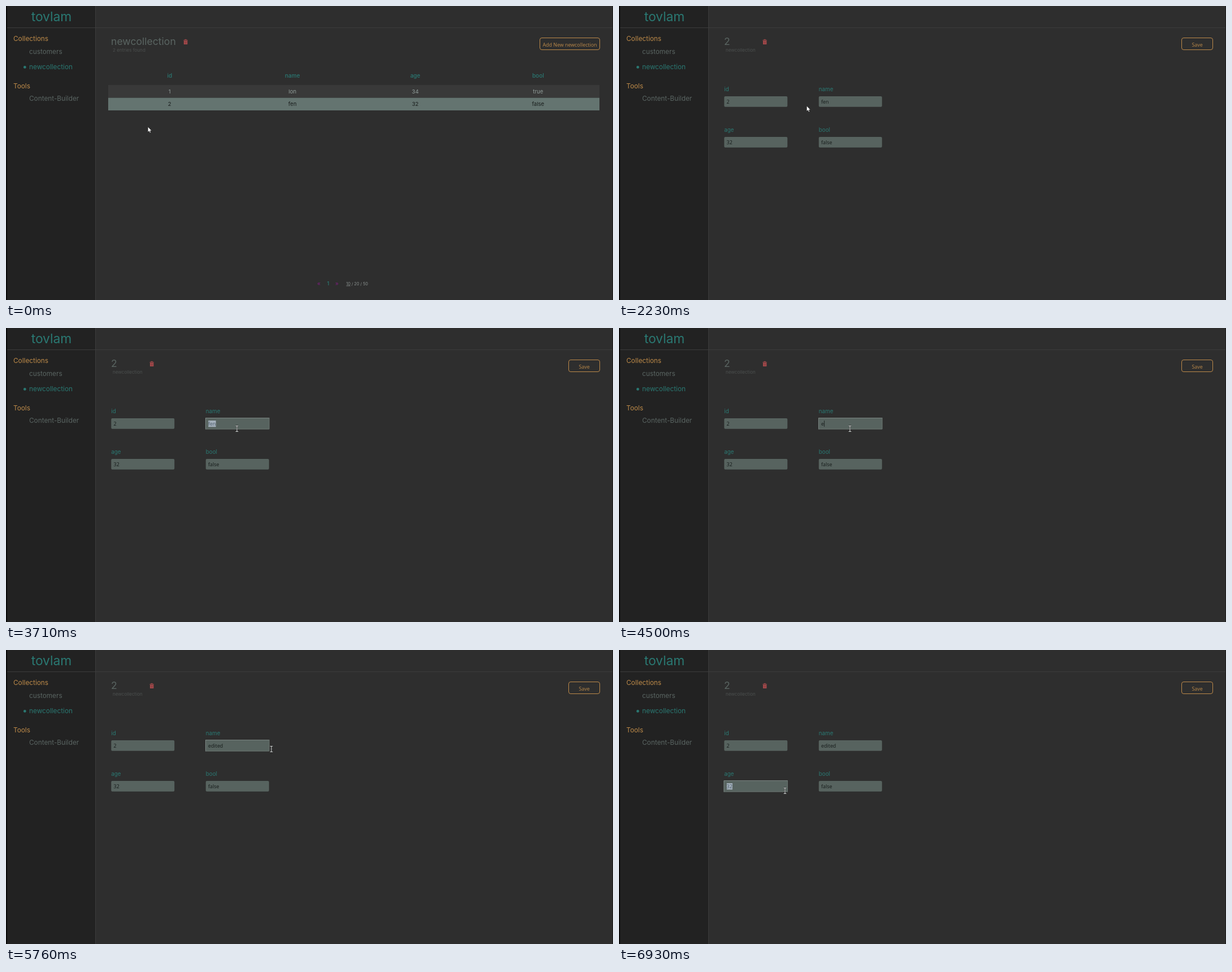
An HTML page that plays this animation: 1075 by 521 pixels, repeating every 8000 ms.

```html
<!DOCTYPE html>
<html lang="en">
<head>
<meta charset="utf-8">
<title>Collection editor</title>
<style>
  html, body { margin: 0; width: 100%; height: 100%; overflow: hidden; background: #2e2e2e; }
  svg { display: block; width: 100vw; height: 100vh; }
  text { font-family: Inter, "Open Sans", sans-serif; white-space: pre; }
  .ui { font-family: "Open Sans", "Noto Sans", sans-serif; font-size: 8.9px; }
  .mid { text-anchor: middle; }
  .teal { fill: #2a7872; }
  .gold { fill: #bd8a49; }
  .grey { fill: #5a6562; }
  .dim { fill: #4b4f4e; }
  .nav { font-size: 11.8px; }
  .title { font-size: 17.6px; }
  .sub { font-size: 8.1px; }
  .head { font-size: 10px; font-weight: 500; }
  .cell { font-size: 9.6px; }
  .label { font-size: 9.8px; }
  .btn { fill: none; stroke: #bd8a49; }
</style>
</head>
<body>
<svg viewBox="0 0 1075 521" preserveAspectRatio="none">
  <defs>
    <g id="trash">
      <path d="M2.3 1.4V.4H5.3V1.4M0 1.9H7.6" fill="none" stroke="#a94a4c"/>
      <path d="M.6 2.7H7V9H.6Z" fill="#a94a4c"/>
      <path d="M2.5 4V8M3.8 4V8M5.1 4V8" stroke="#6d3839" stroke-width=".5"/>
    </g>
  </defs>

  <rect width="1075" height="521" fill="#2e2e2e"/>
  <rect width="158" height="521" fill="#222"/>
  <rect width="2" height="521" fill="#090909"/>
  <rect x="1074" width="1" height="521" fill="#1b1b1b"/>
  <path d="M2 38.5H1074M158.5 0V521" stroke="#3c3c3c"/>

  <text class="teal mid" x="80.5" y="27" font-size="22.8">tovlam</text>
  <g class="nav">
    <text class="gold" x="13" y="62.3">Collections</text>
    <text class="grey" x="41" y="84.5">customers</text>
    <text class="teal" x="41" y="112.3">newcollection</text>
    <text class="gold" x="13" y="146.2">Tools</text>
    <text class="grey" x="41" y="168.2">Content-Builder</text>
  </g>
  <circle class="teal" cx="33.3" cy="108.4" r="2.4"/>

  <g id="list">
    <text class="title grey" x="186" y="69">newcollection</text>
    <text class="sub dim" x="189" y="81">2 entries found</text>
    <use href="#trash" x="314.3" y="59"/>
    <rect class="btn" x="945.5" y="56.5" width="106" height="21" rx="3.5"/>
    <text class="ui gold mid" x="998.5" y="71.5">Add New newcollection</text>
    <rect x="181" y="140" width="870" height="22.5" fill="#393939"/>
    <rect x="181" y="162.7" width="870" height="22.3" fill="#647470"/>
    <g id="cells"></g>
    <g class="mid" font-size="9.5">
      <text x="554" y="494.8" fill="#6d216d" font-weight="600">«</text>
      <text class="teal" x="570.5" y="495" font-weight="500">1</text>
      <text x="586" y="494.8" fill="#6d216d" font-weight="600">»</text>
    </g>
    <text x="602.5" y="494.6" font-size="7.2" fill="#8d9492"><tspan text-decoration="underline">10</tspan> / 20 / 50</text>
  </g>

  <g id="form">
    <text class="title grey" x="186" y="69" font-size="18">2</text>
    <text class="sub dim" x="189" y="81">newcollection</text>
    <use href="#trash" x="254.4" y="59"/>
    <rect class="btn" x="996.5" y="56.5" width="55" height="21" rx="3.5"/>
    <text class="ui gold mid" x="1024" y="71.5">Save</text>
    <g id="fields"></g>
  </g>

  <g id="pointer" stroke-linejoin="round">
    <path id="arrow" d="M0 0V9.6L2.2 7.6 3.6 10.7 5.2 10 3.8 7H6.7Z" fill="#fff" stroke="#111" stroke-width=".5"/>
    <g id="hand">
      <path d="M-.9 .8Q0-.6.9 .8V4.2Q1.7 3.5 2.4 4.4 3.2 3.8 3.8 4.8 5 4.4 5.2 5.8V8Q5 9.6 4.1 10.5V12H-.8V10.8Q-2 9.2-3.4 7.2-3.8 5.8-2.4 6L-.9 7.3Z" fill="#fff" stroke="#111" stroke-width=".6"/>
      <path d="M.9 4.3V6.4M2.4 4.6V6.5M3.8 5V6.6" stroke="#333" stroke-width=".4"/>
    </g>
    <g id="beam" fill="none">
      <path d="M-2.4-5H2.4M0-5V5M-2.4 5H2.4" stroke="#1c1c1c" stroke-width="2"/>
      <path d="M-2.4-5H2.4M0-5V5M-2.4 5H2.4" stroke="#d4d8d7" stroke-width="1.1"/>
    </g>
  </g>
</svg>
<script>
const LOOP = 8000;
const OPEN_AT = 2230;
const $ = id => document.getElementById(id);

function add(parent, tag, attrs, text = '') {
  const el = document.createElementNS('http://www.w3.org/2000/svg', tag);
  for (const key in attrs) el.setAttribute(key, attrs[key]);
  el.textContent = text;
  return parent.appendChild(el);
}
const show = (el, on) => { el.style.display = on ? '' : 'none'; };

// Table
const rows = [
  ['id', 'name', 'age', 'bool'],
  ['1', 'lon', '34', 'true'],
  ['2', 'fen', '32', 'false']
];
const rowStyle = [
  { y: 127.2, class: 'head teal mid' },
  { y: 155, class: 'cell mid', fill: '#919d9a' },
  { y: 177.4, class: 'cell mid', fill: '#191d1c' }
];
rows.forEach((row, r) => row.forEach((text, c) =>
  add($('cells'), 'text', { x: 289.8 + 217.5 * c, ...rowStyle[r] }, text)));

// Form
const fields = {};
rows[0].forEach((name, i) => {
  const x = i % 2 ? 353.8 : 186.3;
  const y = i < 2 ? 160 : 232;
  const g = $('fields');
  add(g, 'text', { class: 'label teal', x, y: y - 9.3 }, name);
  add(g, 'rect', { x, y, width: 112, height: 18.7, rx: 2, fill: '#57635f' });
  const ring = add(g, 'g');
  add(ring, 'rect', { x: x - .8, y: y - 1, width: 113.4, height: 20.5, fill: '#57635f' });
  add(ring, 'path', { d: `M${x - .3} ${y + 19.5}V${y - .5}H${x + 112.6}`, fill: 'none', stroke: '#7b8582' });
  add(ring, 'path', { d: `M${x - .8} ${y + 19}H${x + 112.2}V${y - .5}`, fill: 'none', stroke: '#68726f' });
  const mark = add(ring, 'rect', { x: x + 4.5, y: y + 4, height: 11.3, fill: '#a3afba' });
  const text = add(g, 'text', { class: 'ui', x: x + 4.3, y: y + 13 }, rows[2][i]);
  const caret = add(g, 'rect', { y: y + 4, width: .8, height: 11, fill: '#151a19' });
  fields[name] = { x, ring, mark, text, caret };
});

function paintField(name, value, mode) {
  const f = fields[name];
  f.text.textContent = value;
  f.text.setAttribute('fill', mode === 'all' ? '#4b5b6a' : '#151a19');
  const width = f.text.getComputedTextLength();
  f.mark.setAttribute('width', width);
  f.caret.setAttribute('x', f.x + 4.5 + width);
  show(f.ring, mode);
  show(f.mark, mode === 'all');
  show(f.caret, mode === 'caret');
}

// time, pointer shape, x, y
const moves = [
  [0, 'arrow', 251.3, 214], [740, 'arrow', 262, 205], [840, 'arrow', 277, 194],
  [930, 'hand', 294, 184], [1190, 'hand', 332.6, 177.3], [2230, 'arrow', 332.4, 177],
  [3210, 'arrow', 373.4, 176.7], [3300, 'beam', 409, 178.5],
  [5670, 'beam', 442, 177], [5760, 'beam', 470, 175.5]
];
// Glide from the name field down to the age field
for (let i = 0; i < 8; i++) {
  const p = (i + 1) / 8;
  const e = p * p * (3 - 2 * p);
  moves.push([5950 + 87 * i, p < 1 ? 'arrow' : 'beam', 470 - 176 * e, 175.5 + 74 * e]);
}

// time, name value, name mode, age mode
const edits = [
  [0, 'fen', '', ''], [3540, 'fen', 'caret', ''], [3710, 'fen', 'all', ''],
  [4500, 'e', 'caret', ''], [4800, 'ed', 'caret', ''], [4890, 'edi', 'caret', ''],
  [5090, 'edit', 'caret', ''], [5180, 'edite', 'caret', ''], [5480, 'edited', 'caret', ''],
  [5670, 'edited', 'focus', ''], [6730, 'edited', '', 'caret'], [6930, 'edited', '', 'all']
];

const at = (table, t) => table.findLast(step => step[0] <= t);

function draw(t) {
  show($('list'), t < OPEN_AT);
  show($('form'), t >= OPEN_AT);

  const [, shape, x, y] = at(moves, t);
  for (const id of ['arrow', 'hand', 'beam']) show($(id), id === shape);
  $('pointer').setAttribute('transform', `translate(${x} ${y})`);

  const [, name, nameMode, ageMode] = at(edits, t);
  paintField('id', '2', '');
  paintField('name', name, nameMode);
  paintField('age', '32', ageMode);
  paintField('bool', 'false', '');
}

const start = performance.now();
function tick() {
  draw((performance.now() - start) % LOOP);
  requestAnimationFrame(tick);
}
tick();
</script>
</body>
</html>
```
